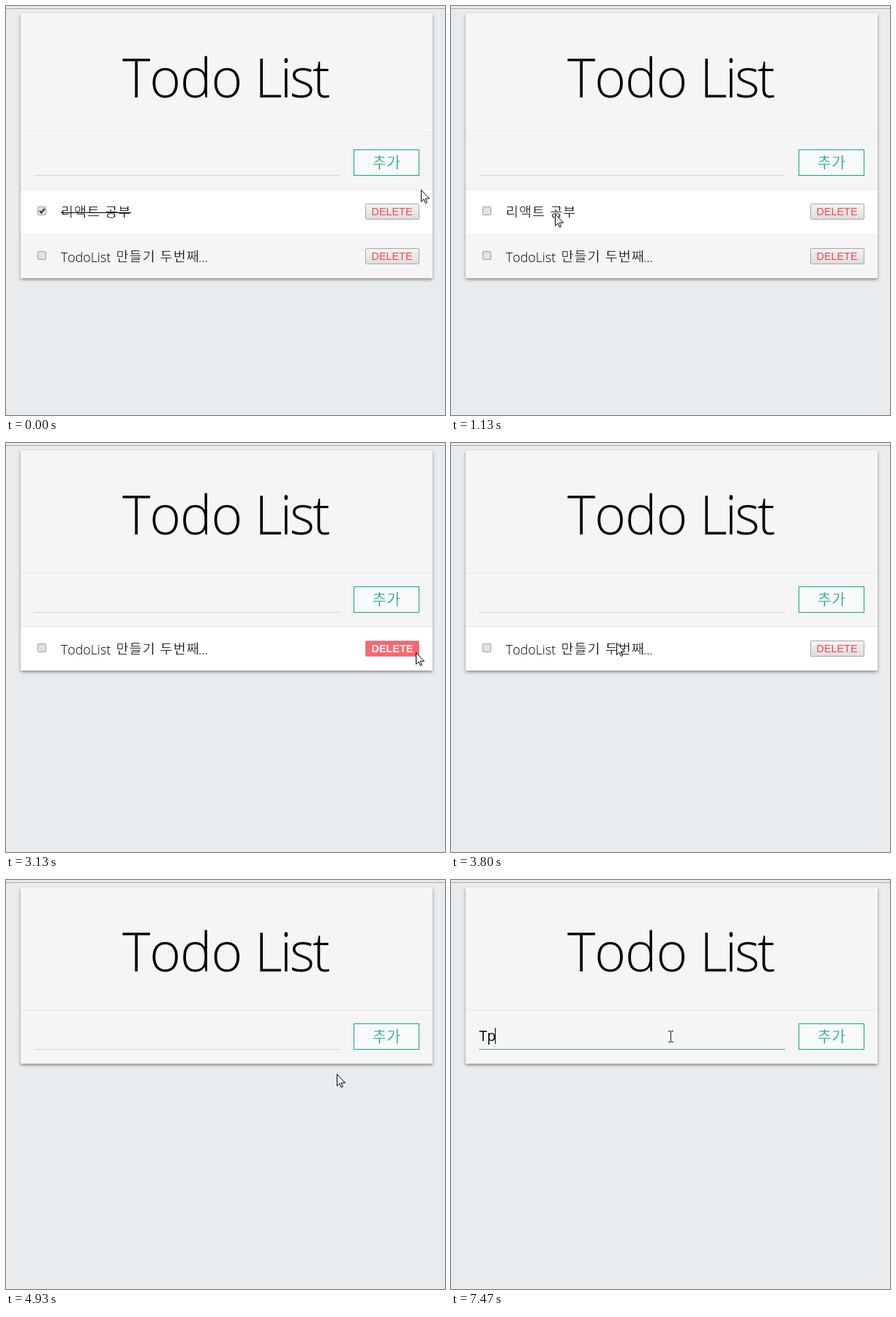
Write an HTML page that moves like this. It is 600 px wide and 559 px high and loops after 8 s.

```html
<!DOCTYPE html>
<html lang="ko">
<head>
<meta charset="utf-8">
<title>Todo List</title>
<style>
  html, body { margin: 0; width: 100%; height: 100%; overflow: hidden; background: #e8ecef; }
  svg { display: block; width: 600px; height: 559px; }
  text { font-family: 'Open Sans', 'Noto Sans CJK KR', 'Noto Sans CJK', sans-serif; font-kerning: none; white-space: pre; }
  .title { font-size: 73px; font-weight: 300; letter-spacing: -1px; }
  .tight { letter-spacing: -3px; }
  .latin { font-size: 17.8px; font-weight: 350; }
  /* A background-coloured outline thins the regular weight. */
  .hangul, .add { font: 300 18.5px 'Noto Sans CJK KR', 'Noto Sans CJK', sans-serif; stroke: #fafafa; stroke-width: .4; }
  .hangul { letter-spacing: 1px; }
  .add { font-size: 21px; text-anchor: middle; fill: #16a57c; }
  .delete { font-family: 'Liberation Sans', Arial, sans-serif; font-size: 14.4px; fill: #ff4350; }
  .face { fill: url(#face); stroke: #a6a6a6; }
  .hover .face { fill: #ff6570; }
  .hover .delete { fill: #fff; font-weight: bold; }
  .ring { fill: none; stroke: #7fa4dc; stroke-width: 2; }
</style>
</head>
<body>
<svg viewBox="0 0 600 559" xmlns="http://www.w3.org/2000/svg">
  <defs>
    <linearGradient id="face" x2="0" y2="1">
      <stop stop-color="#f4f4f4"/><stop offset="1" stop-color="#dddddd"/>
    </linearGradient>
    <filter id="shadow" x="-5%" y="-5%" width="110%" height="112%">
      <feDropShadow dx="0" dy="2" stdDeviation="2" flood-color="#000" flood-opacity=".42"/>
    </filter>
  </defs>
  <rect width="600" height="559" fill="#e8ecef"/>
  <rect width="600" height="3" fill="#e9e9e9"/>
  <rect y="3" width="600" height="1" fill="#a9a9a9"/>

  <rect id="card" x="20" y="10" width="563" height="362" fill="#f5f5f5" filter="url(#shadow)"/>
  <text class="title" x="159" y="125">Todo<tspan class="tight" x="340">List</tspan></text>
  <rect x="20" y="177" width="563" height="1" fill="#e6e6e6"/>
  <rect id="underline" x="38" y="231" width="419" height="1"/>
  <text id="typed" x="38.5" y="219.5" font-size="19.5"></text>
  <rect id="caret" y="202" width="1" height="22"/>
  <rect x="475.5" y="196.5" width="89" height="35" fill="#f8f9fb" stroke="#16a57c"/>
  <text class="add" x="520" y="221">추가</text>

  <g id="rows"></g>
  <rect id="divider" x="20" y="250" width="563" height="1" fill="#e4e6e8"/>

  <path id="arrow" d="M.5 .5V16.5L4 13L6.5 18.5L8.5 17.5L6.2 12.2H11.5Z" fill="#fff" stroke="#000"/>
  <path id="beam" d="M-3 -7.5H0M1 -7.5H4M.5 -7V7M-3 7.5H0M1 7.5H4" fill="none" stroke="#222"/>
</svg>
<script>
const LOOP = 8000, FPS = 15, ROW = 61, LIST_TOP = 250;
const $ = id => document.getElementById(id);
const show = (node, on) => node.setAttribute('visibility', on ? 'inherit' : 'hidden');

// Pointer stops: step, x, y
const path = [
  [0, 567, 251], [4, 420, 318], [7, 230, 336], [10, 65, 302], [12, 142, 284],
  [31, 142, 284], [34, 470, 300], [36, 597, 300], [38, 560, 286],
  [50, 560, 286], [54, 360, 309], [57, 226, 273], [60, 200, 290], [63, 310, 291],
  [65, 480, 286], [66, 474, 291], [68, 474, 291], [69, 500, 288], [71, 512, 286],
  [72, 512, 286], [79, 302, 214], [81, 302, 214], [82, 300, 214]
];

function pointerAt(step) {
  const i = path.findIndex(p => p[0] > step);
  if (i < 0) return path[path.length - 1].slice(1);
  const [s0, x0, y0] = path[i - 1], [s1, x1, y1] = path[i];
  const k = (step - s0) / (s1 - s0);
  return [Math.round(x0 + (x1 - x0) * k), Math.round(y0 + (y1 - y0) * k)];
}

function makeRow(label, lineWidth) {
  const g = document.createElementNS('http://www.w3.org/2000/svg', 'g');
  g.innerHTML = `
    <rect class="back" x="20" width="563" height="${ROW}"/>
    <rect x="43.5" y="24.5" width="11" height="11" rx="1.5" fill="#e2e2e2" stroke="#a0a0a0"/>
    <path class="done" d="M46 30L48.3 32.6L52.8 27" fill="none" stroke="#3c3c3c" stroke-width="2.2"/>
    ${label}
    <rect class="done" x="75" y="32" width="${lineWidth}" height="1"/>
    <g class="button">
      <rect class="face" x="491.5" y="20.5" width="73" height="21" rx="1"/>
      <rect class="ring" x="492" y="21" width="73" height="20" rx="1"/>
      <text class="delete" x="499.5" y="36">DELETE</text>
    </g>`;
  $('rows').append(g);
  return g;
}

const study = makeRow('<text class="hangul" x="75" y="38">리액트 공부</text>', 96);
const build = makeRow(
  '<text class="latin" x="75" y="39">TodoList</text>' +
  '<text class="hangul" x="150.5" y="38">만들기 두번째</text>' +
  '<text class="latin" x="263" y="39">...</text>', 201);

function drawRow(row, index, done, pressed, [px, py]) {
  show(row, index >= 0);
  if (index < 0) return;
  const top = LIST_TOP + ROW * index;
  const y = py - top;
  const hover = px >= 491 && px < 565 && y >= 20 && y < 42;
  row.setAttribute('transform', `translate(0 ${top})`);
  row.querySelector('.back').setAttribute('fill', index ? '#f5f5f5' : '#fff');
  row.querySelectorAll('.done').forEach(node => show(node, done));
  row.querySelector('.button').classList.toggle('hover', hover);
  show(row.querySelector('.ring'), pressed);
}

function draw(time) {
  const step = Math.floor(time * FPS / 1000 + 0.06);
  const pointer = pointerAt(step);
  const [px, py] = pointer;
  const count = step < 47 ? 2 : step < 73 ? 1 : 0;

  drawRow(study, count === 2 ? 0 : -1, step < 17 || step >= 27, step >= 45, pointer);
  drawRow(build, count - 1, step >= 60, step >= 71, pointer);
  $('card').setAttribute('height', LIST_TOP - 10 + ROW * count + (count ? 0 : 1));
  show($('divider'), count > 0);

  const focused = step >= 79;
  const typed = step >= 112 ? 'Tp' : step >= 108 ? 'T' : '';
  const caretOn = focused && (step >= 108 || Math.floor((step - 79) / 8) % 2 === 0);
  $('underline').setAttribute('fill', focused ? '#5a9f88' : '#ced3d3');
  $('typed').textContent = typed;
  $('caret').setAttribute('x', [38, 49, 60][typed.length]);
  show($('caret'), caretOn);

  const overInput = px >= 38 && px < 457 && py >= 196 && py < 232;
  show($('arrow'), !overInput);
  show($('beam'), overInput);
  for (const id of ['arrow', 'beam']) $(id).setAttribute('transform', `translate(${px} ${py})`);
}

const start = performance.now();
function tick() {
  draw((performance.now() - start) % LOOP);
  requestAnimationFrame(tick);
}
tick();
</script>
</body>
</html>
```
